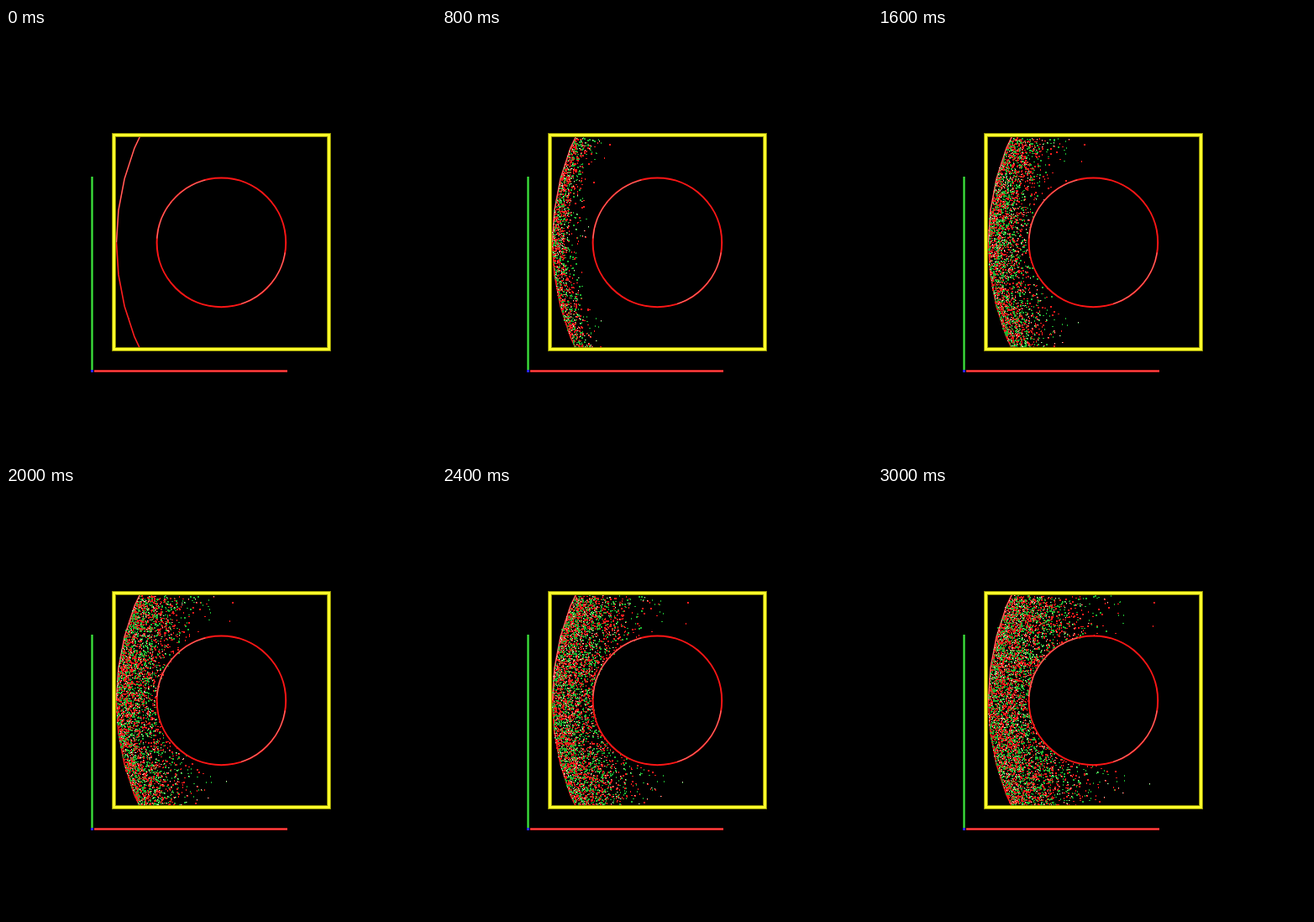
Write an HTML page with a canvas that moves like this. It is 512 by 512 pixels and loops after 3.1 s.

```html
<!DOCTYPE html>
<html>
<head>
<meta charset="utf-8">
<style>
html, body { margin: 0; height: 100%; overflow: hidden; background: #000; }
canvas { display: block; }
</style>
</head>
<body>
<canvas id="stage" width="512" height="512"></canvas>
<script>
const ctx = document.getElementById('stage').getContext('2d');
const STEP = 100, STEPS = 31, RATE = 200, THERMAL = 1.9;
const CX = 256.4, CY = 255.4, RADIUS = 76.8;
const EMITTER_R = 305, EMITTER_X = 131;
const DOT_SIZES = [[2, 1], [1, 2], [2, 2]];

let seed = 20;
function random() {
  seed = (seed + 0x6D2B79F5) | 0;
  let t = Math.imul(seed ^ (seed >>> 15), 1 | seed);
  t = (t + Math.imul(t ^ (t >>> 7), 61 | t)) ^ t;
  return ((t ^ (t >>> 14)) >>> 0) / 4294967296;
}
const gauss = () => Math.sqrt(-2 * Math.log(1 - random())) * Math.cos(2 * Math.PI * random());
const emitterX = y => EMITTER_X + EMITTER_R - Math.sqrt(EMITTER_R ** 2 - (y - CY) ** 2);

function particle(birth, y, vx, vy, color) {
  const x = emitterX(y);
  const at = step => [x + vx * (step - birth), y + vy * (step - birth)];
  let death = Math.ceil(birth);
  for (; death < STEPS; death++) {
    const [px, py] = at(death);
    if (Math.hypot(px - CX, py - CY) < RADIUS || py < 130 || py > 381) break;
  }
  const size = DOT_SIZES[Math.floor(random() * DOT_SIZES.length)];
  return { birth, death, at, color, size, glint: random() < 0.2 };
}

// The three fastest particles lead; the rest leave with a thermal flux spread.
const RED = '#ff1c1c', GREEN = '#1eb432';
const particles = [
  particle(0.5, 138, 5.87, 0, RED),
  particle(0.8, 149.8, 6.05, 0.55, RED),
  particle(0.7, 345.7, 6.07, 0.28, GREEN)
];
for (let i = 0; i < RATE * (STEPS - 1); i++) {
  const vx = THERMAL * Math.sqrt(-2 * Math.log(1 - 0.99 * random()));
  particles.push(particle(i / RATE, 130 + 251 * random(), vx, 0.35 * gauss(),
    random() < 0.54 ? RED : GREEN));
}

function stroke(color, width, trace) {
  ctx.strokeStyle = color;
  ctx.lineWidth = width;
  ctx.beginPath();
  trace();
  ctx.stroke();
}
function tube(edge, core, width, trace) {
  stroke(edge, width, trace);
  stroke(core, width - 2, trace);
}
const line = (x1, y1, x2, y2) => () => { ctx.moveTo(x1, y1); ctx.lineTo(x2, y2); };
const arc = (from, to) => () => ctx.arc(CX, CY, RADIUS, from * Math.PI, to * Math.PI);
function emitter() {
  for (let i = -4; i <= 4; i++) {
    const a = i * Math.PI / 25;
    ctx.lineTo(EMITTER_X + 0.5 + EMITTER_R * (1 - Math.cos(a)), CY + EMITTER_R * Math.sin(a));
  }
}
function clipped(height, paint) {
  ctx.save();
  ctx.beginPath();
  ctx.rect(130, 129, 252, height);
  ctx.clip();
  paint();
  ctx.restore();
}
function drawParticles(step) {
  for (const p of particles) {
    if (step < p.birth || step >= p.death) continue;
    const [x, y] = p.at(step).map(Math.round);
    ctx.fillStyle = p.color;
    ctx.fillRect(x, y, ...p.size);
    if (p.glint) {
      ctx.fillStyle = '#f0d8c4';
      ctx.fillRect(x, y, 1, 1);
    }
  }
}

function draw(step) {
  ctx.fillStyle = '#000';
  ctx.fillRect(0, 0, 512, 512);

  clipped(252, () => {
    stroke('#ff1e1e', 1.6, emitter);
    drawParticles(step);
  });
  clipped(126, () => stroke('#ffb0a8', 0.6, emitter));

  stroke('#ff1616', 2, arc(0, 2));
  stroke('#ffc0b8', 0.6, arc(1.02, 1.42));
  stroke('#ffc0b8', 0.6, arc(0.05, 0.4));

  tube('#8c8c00', '#ffff2a', 5, () => ctx.rect(128.5, 127.5, 256, 255));
  tube('#1f9a1f', '#46dc46', 3, line(102.5, 177, 102.5, 407));
  tube('#cc2020', '#ff4a4a', 3, line(105, 408.5, 335, 408.5));
  ctx.fillStyle = '#2828ff';
  ctx.fillRect(101, 407, 3, 3);
}

function frame() {
  draw(Math.floor(performance.now() / STEP) % STEPS);
  requestAnimationFrame(frame);
}
frame();
</script>
</body>
</html>
```
